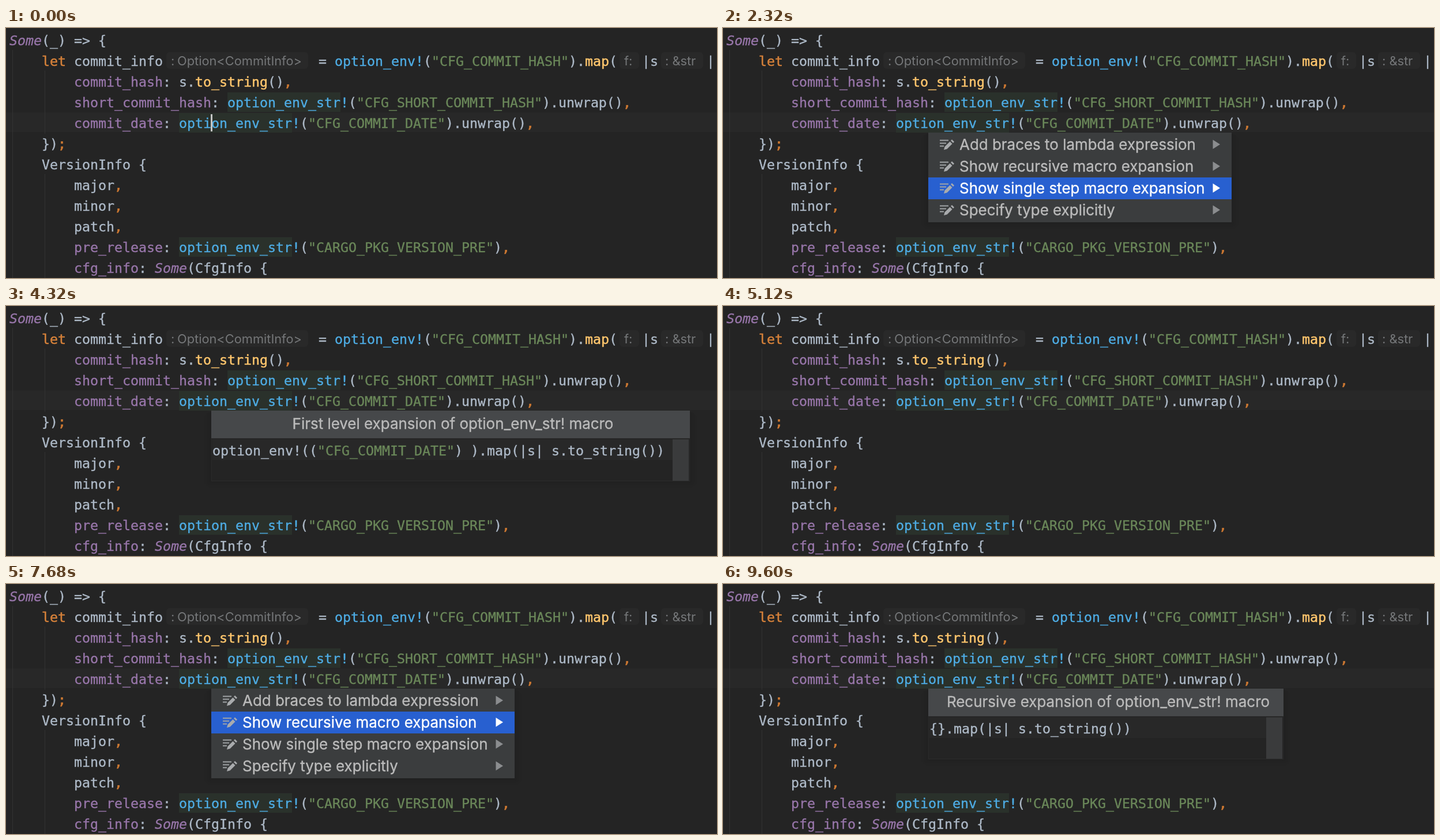
These frames come from a looping animation (1233x435 px, 9680 ms). An HTML page:

```html
<!DOCTYPE html>
<html lang="en">
<head>
<meta charset="utf-8">
<title>Macro expansion in an editor</title>
<style>
  html, body { margin: 0; width: 100%; height: 100%; overflow: hidden; background: #242424; }
  svg { display: block; width: 1233px; height: 435px; }
  text { white-space: pre; }
  .code { font: 23.254px "DejaVu Sans Mono", monospace; color: #aebac8; }
  .ui { font: 25.95px Inter, sans-serif; color: #bbb; }
  .hint { font: 21.8px Inter, sans-serif; color: #757779; }
  .code, .ui, .code tspan { fill: currentColor; stroke: currentColor; stroke-width: .35px; }
  .hint { fill: currentColor; }
  .code .field { color: #9876aa; }
  .code .variant { color: #9876aa; font-style: italic; }
  .code .string { color: #6a8759; }
  .code .punct { color: #cc7832; stroke-width: .7px; }
  .code .keyword { color: #d5813a; stroke-width: .5px; }
  .code .macro { color: #4eade5; }
  .code .method { color: #ffc66d; stroke-width: .5px; }
</style>
</head>
<body>
<svg id="stage" viewBox="0 0 1233 435" xmlns="http://www.w3.org/2000/svg"></svg>
<script>
const LOOP = 9680, STEP = 80, CELL = 14, ROW = 36, LEFT = 6;
const stage = document.getElementById('stage');

function add(parent, tag, attrs = {}, content = '') {
  const node = document.createElementNS('http://www.w3.org/2000/svg', tag);
  for (const [name, value] of Object.entries(attrs)) node.setAttribute(name, value);
  node.textContent = content;
  return parent.appendChild(node);
}

const rect = (parent, x, y, width, height, fill, extra = {}) =>
  add(parent, 'rect', { x, y, width, height, fill, ...extra });

// Tokens are plain strings or [class, string] pairs.
function code(parent, x, y, tokens) {
  const line = add(parent, 'text', { class: 'code', x, y });
  for (const token of tokens) {
    const [kind, value] = Array.isArray(token) ? token : ['plain', token];
    add(line, 'tspan', { class: kind }, value);
  }
}

const row = (index, column, ...tokens) =>
  code(stage, LEFT + column * CELL, 30 + index * ROW, tokens);

const hintText = (x, label) => add(stage, 'text', { class: 'hint', x, y: 64.5 }, label);

function hint(x, width, textX, label) {
  rect(stage, x, 42, width, 29, '#292929', { rx: 6 });
  hintText(textX, label);
}

const field = s => ['field', s], string = s => ['string', `"${s}"`];
const macro = s => ['macro', s], method = s => ['method', s];
const comma = ['punct', ','];

function drawEditor() {
  rect(stage, 0, 147, 1233, 34, '#282828');
  for (const [x, y, h] of [[11, 38, 397], [67, 74, 110], [67, 254, 181]])
    rect(stage, x, y, 1, h, '#333');
  for (const [x, y] of [[384, 112], [300, 148], [300, 364]])
    rect(stage, x, y, 196, 34, '#2a312b');

  row(0, 0, ['variant', 'Some'], '(_) => {');
  row(1, 4, ['keyword', 'let'], ' commit_info');
  hint(278, 246, 286, ':');
  hintText(297, 'Option<CommitInfo>');
  code(stage, 542, 66, ['= ', macro('option_env!'), '(', string('CFG_COMMIT_HASH'), ').', method('map'), '(']);
  hint(1064, 34, 1072, 'f:');
  code(stage, 1103, 66, ['|s']);
  hint(1136, 73, 1143, ': &str');
  code(stage, 1215, 66, ['|']);
  row(2, 8, field('commit_hash'), ': s.', method('to_string'), '()', comma);
  row(3, 8, field('short_commit_hash'), ': ', macro('option_env_str!'), '(',
    string('CFG_SHORT_COMMIT_HASH'), ').unwrap()', comma);
  row(4, 8, field('commit_date'), ': ', macro('option_env_str!'), '(',
    string('CFG_COMMIT_DATE'), ').unwrap()', comma);
  row(5, 4, '})', ['punct', ';']);
  row(6, 4, 'VersionInfo {');
  ['major', 'minor', 'patch'].forEach((name, i) => row(7 + i, 8, name, comma));
  row(10, 8, field('pre_release'), ': ', macro('option_env_str!'), '(',
    string('CARGO_PKG_VERSION_PRE'), ')', comma);
  row(11, 8, field('cfg_info'), ': ', ['variant', 'Some'], '(CfgInfo {');
}

function shadow(group, width, height) {
  for (const spread of [12, 8, 4])
    rect(group, 356 - spread, 184, width + 2 * spread, height + spread, '#000', { opacity: .03, rx: spread });
}

function createMenu() {
  const group = add(stage, 'g');
  shadow(group, 526, 154);
  rect(group, 356, 182, 526, 156, '#3b3d3e');
  const highlight = rect(group, 356, 184, 526, 38, '#2860d0');
  const labels = ['Add braces to lambda expression', 'Show recursive macro expansion',
    'Show single step macro expansion', 'Specify type explicitly'];
  const items = labels.map((label, i) => {
    const item = add(group, 'g', { transform: `translate(0 ${184 + i * 38})` });
    add(item, 'path', { d: 'M376 11.5h15M376 16.5h11M376 21.5h7', stroke: '#a0a3a5', 'stroke-width': 2 });
    add(item, 'path', { d: 'M383 28l1.5-5.5 9-9 4 4-9 9zM395 12l2-2 4 4-2 2z', fill: '#a9abad' });
    const text = add(item, 'text', { class: 'ui', x: 410, y: 28 }, label);
    const arrow = add(item, 'path', { d: 'M849.5 10.5L862 18.5L849.5 26.5Z' });
    return { text, arrow };
  });
  return selected => {
    group.style.display = selected === undefined ? 'none' : '';
    if (selected === undefined) return;
    highlight.setAttribute('y', 184 + selected * 38);
    items.forEach(({ text, arrow }, i) => {
      text.style.color = i === selected ? '#fff' : '#bbb';
      arrow.setAttribute('fill', i === selected ? '#fff' : '#8b8d8f');
    });
  };
}

function createPopup(width, titleX, title, tokens) {
  const group = add(stage, 'g');
  shadow(group, width, 120);
  rect(group, 356, 182, width, 122, '#242424');
  rect(group, 356.5, 230.5, width - 1, 74, 'none', { stroke: '#2b2b2b' });
  rect(group, 358, 232, width - 32, 36, '#282828');
  rect(group, 356, 182, width, 48, '#46484a');
  rect(group, 356 + width - 30, 232, 28, 72, '#3a3b3c');
  add(group, 'text', { class: 'ui', x: titleX, y: 214, 'text-anchor': 'middle' }, title);
  code(group, 358, 260, tokens);
  return group;
}

drawEditor();
const caret = rect(stage, 355, 150, 3, 30, '#c4c4c4');
const showMenu = createMenu();
const popups = {
  first: createPopup(830, 775, 'First level expansion of option_env_str! macro',
    ['option_env!((', string('CFG_COMMIT_DATE'), ') ).map(|s| s.to_string())']),
  recursive: createPopup(616, 668, 'Recursive expansion of option_env_str! macro',
    ['{}.map(|s| s.to_string())'])
};

const timeline = [
  { at: 0, caret: true },
  { at: 480 },
  { at: 960, menu: 0 },
  { at: 1920, menu: 1 },
  { at: 2240, menu: 2 },
  { at: 2880, popup: 'first' },
  { at: 4560, caret: true },
  { at: 5040 },
  { at: 5520, caret: true },
  { at: 5920, menu: 0 },
  { at: 7200, menu: 1 },
  { at: 8320, popup: 'recursive' }
];

function render(time) {
  const t = Math.floor((time % LOOP) / STEP) * STEP;
  const state = timeline.filter(entry => entry.at <= t).pop();
  caret.style.display = state.caret ? '' : 'none';
  showMenu(state.menu);
  for (const [name, group] of Object.entries(popups))
    group.style.display = state.popup === name ? '' : 'none';
}

const start = performance.now();
function tick() {
  render(performance.now() - start);
  requestAnimationFrame(tick);
}
tick();
</script>
</body>
</html>
```
